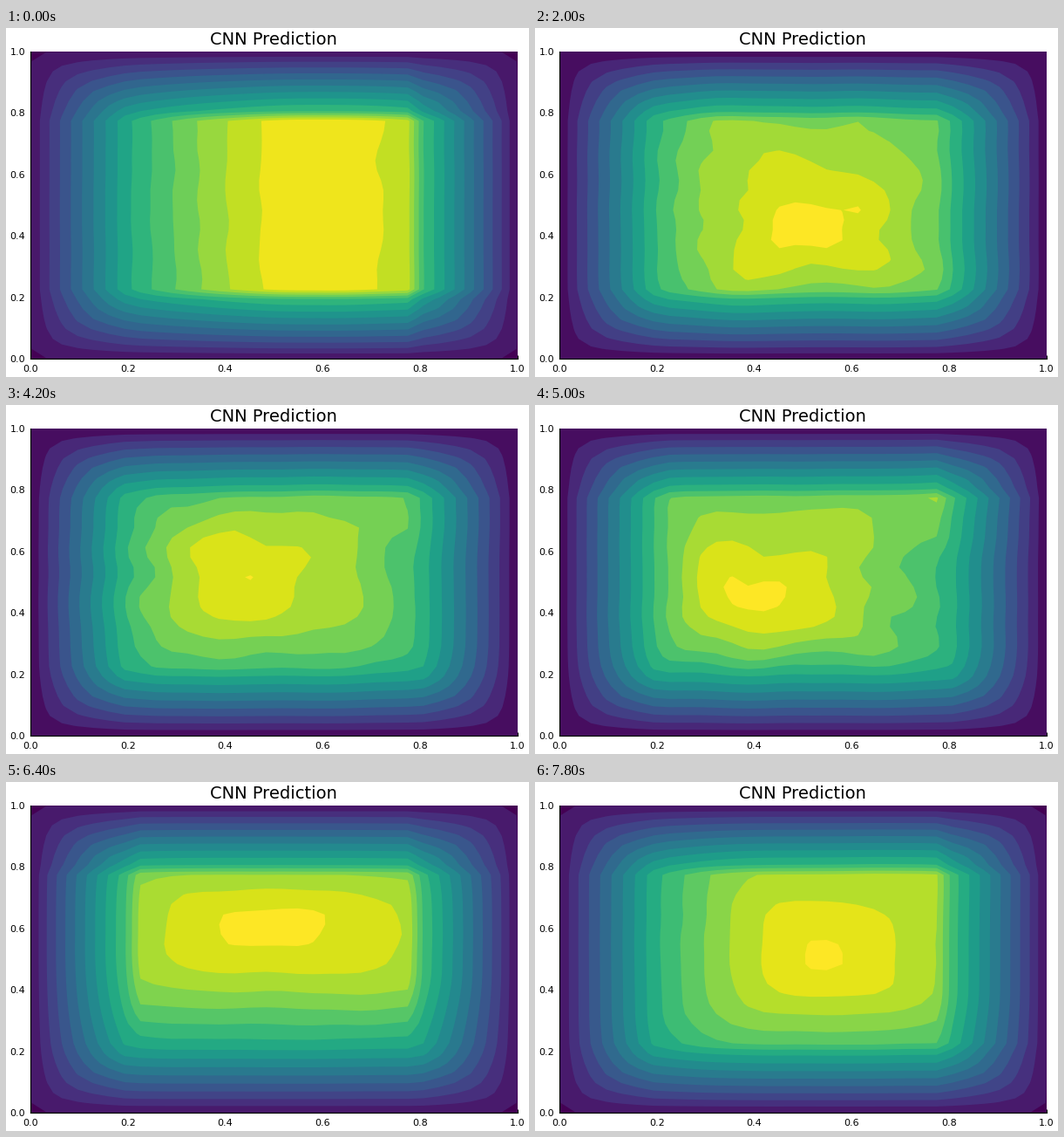
Animation, 600 px wide and 400 px high, one loop 8000 ms. Source, as a matplotlib script:

```python
import numpy as np
import matplotlib.pyplot as plt
from matplotlib.animation import FuncAnimation

W, H, DPI = 600, 400, 100
N_FRAMES, STEP_MS = 40, 200
GRID, LO, HI = 32, 7, 24          # grid size and the inner block's cell range
A, B = LO / (GRID - 1), HI / (GRID - 1)

# Step, peak x, y and height, drop to left, right, top, bottom, corner lift.
# Heights are counted in contour bands.
POSES = np.array([
    (0, 0.58, 0.50, 15.9, 5.4, 1.5, 0.3, 0.3, 0.0),
    (6, 0.43, 0.55, 15.4, 2.5, 2.3, 1.2, 3.3, 1.5),
    (10, 0.50, 0.43, 13.3, 3.6, 2.9, 2.3, 2.3, 0.0),
    (17, 0.49, 0.53, 13.2, 4.2, 3.8, 3.2, 3.6, 0.3),
    (25, 0.37, 0.45, 13.2, 2.9, 4.0, 2.9, 4.2, 2.2),
    (32, 0.48, 0.60, 15.4, 2.1, 1.6, 2.4, 5.8, 0.0),
    (39, 0.54, 0.50, 15.1, 4.6, 2.2, 1.9, 3.9, 0.5),
])

cells = np.arange(GRID)
axis = cells / (GRID - 1)
inner = np.clip(cells, LO, HI)
X, Y = np.meshgrid(axis[inner], axis[inner])
cmap = plt.get_cmap("viridis")


def pose(i):
    """Peak and drops at step i, gliding from pose to pose."""
    return [np.interp(i, POSES[:, 0], col) for col in POSES[:, 1:].T]


def slope(p, centre, low, high):
    """Drop on either side of the centre, full at the block's rim."""
    below = low * (np.maximum(centre - p, 0) / (centre - A)) ** 1.5
    above = high * (np.maximum(p - centre, 0) / (B - centre)) ** 1.5
    return below + above


def texture(i):
    """Small uneven ripples, new at every step."""
    z = np.random.default_rng(100 + i).normal(size=(GRID, GRID))
    for _ in range(2):
        for d in (0, 1):
            z = (np.roll(z, 1, d) + 2 * z + np.roll(z, -1, d)) / 4
    return 3.6 * z[np.ix_(inner, inner)]


def falloff(m, low, high):
    """Share of the rim height kept towards the border, along the last axis."""
    dist = np.minimum(cells, GRID - 1 - cells)
    jump = np.where(cells < LO, low, high) / np.sqrt(m)
    ramp = np.minimum(jump, 1) * (np.minimum(dist, LO - 1) / (LO - 1)) ** 0.9
    return np.where((cells >= LO) & (cells <= HI), 1, ramp)


def field(i):
    """Heights on the grid, with the colour span and shift in bands."""
    px, py, peak, left, right, top, bottom, lift = pose(i)
    tall = np.clip((peak - 13.3) / 1.8, 0, 1)
    edge = 0.1 + 0.87 * tall

    drop = np.cbrt(slope(X, px, left, right) ** 3
                   + slope(Y, py, bottom, top) ** 3)
    corner = ((X - A) * (Y - A) / (B - A) ** 2) ** 4
    m = peak - edge - drop + lift * corner
    m += (0.2 - 0.14 * tall) * texture(i)

    fx, fy = falloff(m, 2.8, 2.75), falloff(m.T, 2.6, 2.6).T
    share = np.minimum(fx, fy) * np.maximum(fx, fy) ** 0.7
    return edge + m * share, peak - 0.5 * tall, 0.45 * (1 - tall)


fig = plt.figure(figsize=(W / DPI, H / DPI), dpi=DPI, facecolor="white")
ax = fig.add_axes([28 / W, 21 / H, 559 / W, 352 / H])
ax.set_axisbelow(True)
ax.set_xticks(np.arange(6) / 5)
ax.set_yticks(np.arange(6) / 5)
ax.tick_params(direction="in", length=2.6, width=0.7, labelbottom=False,
               labelleft=False)
ax.spines[["top", "right"]].set_visible(False)
ax.spines[["left", "bottom"]].set_linewidth(0.8)


def label(x, y, text, size, ha="center"):
    fig.text(x / W, 1 - y / H, text, fontsize=size, ha=ha, va="baseline",
             family="DejaVu Sans")


label(306.5, 19, "CNN Prediction", 14)
for v in np.arange(6) / 5:
    label(28 + 559 * v, 394.5, f"{v:.1f}", 8)
    label(22, 383 - 352 * v, f"{v:.1f}", 8, "right")

layers = []


def draw(i):
    while layers:
        layers.pop().remove()
    z, span, shift = field(i)
    for j in range(int(z.max()) + 1):
        shade = cmap(float(np.clip((j + shift) / span, 0, 1)))
        layers.append(ax.contourf(axis, axis, z, levels=[j, 99],
                                  colors=[shade], antialiased=True))
    ax.set(xlim=(0, 1), ylim=(0, 1))
    return []


anim = FuncAnimation(fig, draw, frames=N_FRAMES, interval=STEP_MS,
                     repeat=True, repeat_delay=0, blit=False)
plt.show()
```
